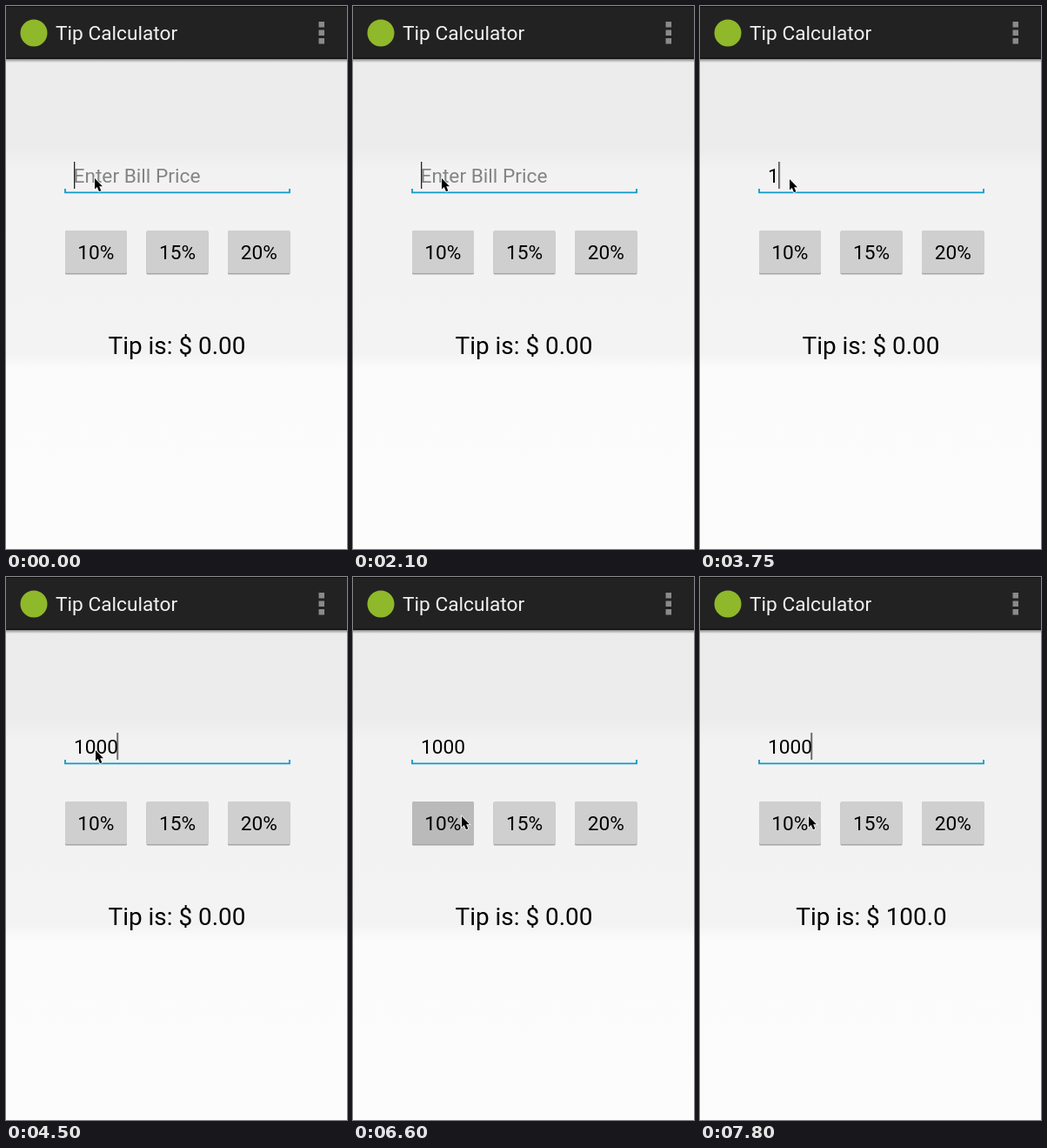
An HTML page for the animation above (8 s loop, 392 by 624 pixels).

```html
<!DOCTYPE html>
<html lang="en">
<head>
<meta charset="utf-8">
<title>Tip Calculator</title>
<style>
  html, body { margin: 0; width: 100%; height: 100%; overflow: hidden; background: #fbfbfb; }
  svg { display: block; }
  text { font: 22.7px Roboto, sans-serif; fill: #000; }
  .title { fill: #f2f2f2; }
  .hint { fill: #848484; }
  .tip { font-size: 27.9px; }
  .mid { text-anchor: middle; }

  .hint, .typed, .caret, .blink, .pressed, .before, .after, .pointer {
    animation: 8s step-end infinite;
  }
  .hint { animation-name: hint; }
  .typed { animation-name: type; }
  .caret { animation-name: caret; }
  .blink { animation-name: blink; }
  .pressed { animation-name: press; }
  .before { animation-name: before; }
  .after { animation-name: after; }
  .pointer { animation-name: point; }

  @keyframes hint { 0% { opacity: 1 } 46.875%, 100% { opacity: 0 } }
  @keyframes type {
    0% { width: 0 }
    46.875% { width: 12.7px }
    50.625% { width: 25.4px }
    52.5% { width: 38.1px }
    56.25%, 100% { width: 54px }
  }
  @keyframes caret {
    0% { transform: none }
    46.875% { transform: translateX(12.3px) }
    50.625% { transform: translateX(24.7px) }
    52.5% { transform: translateX(37.1px) }
    56.25%, 100% { transform: translateX(49.5px) }
  }
  @keyframes blink {
    0%, 13.125%, 26.25%, 37.5%, 73.125%, 86.25%, 97.5%, 100% { opacity: 1 }
    5.625%, 18.75%, 31.875%, 65.625%, 78.75%, 91.875% { opacity: 0 }
  }
  @keyframes press { 0%, 84.375%, 100% { fill: #cfcfcf } 82.5% { fill: #bababa } }
  @keyframes before { 0% { opacity: 1 } 84.375%, 100% { opacity: 0 } }
  @keyframes after { 0% { opacity: 0 } 84.375%, 100% { opacity: 1 } }
  @keyframes point {
    0% { transform: translate(102px, 198px) }
    31.875% { transform: translate(103px, 199px) }
    75% { transform: translate(118px, 233px) }
    76.875% { transform: translate(124px, 262px) }
    78.75% { transform: translate(125px, 270px) }
    80.625%, 100% { transform: translate(125px, 275px) }
  }
</style>
</head>
<body>
<svg width="392" height="624" viewBox="0 0 392 624">
  <defs>
    <linearGradient id="page" gradientUnits="userSpaceOnUse" x1="0" y1="0" x2="0" y2="624">
      <stop offset="0" stop-color="#ebebeb"/>
      <stop offset=".26" stop-color="#ececec"/>
      <stop offset=".3" stop-color="#f2f2f2"/>
      <stop offset=".64" stop-color="#f3f3f3"/>
      <stop offset=".667" stop-color="#fbfbfb"/>
      <stop offset="1" stop-color="#fcfcfc"/>
    </linearGradient>
    <linearGradient id="shade" x2="0" y2="1">
      <stop offset="0" stop-color="#000" stop-opacity=".4"/>
      <stop offset="1" stop-color="#000" stop-opacity="0"/>
    </linearGradient>
    <clipPath id="entry"><rect class="typed" x="78" y="175" width="0" height="36"/></clipPath>
  </defs>

  <rect width="392" height="624" fill="url(#page)"/>

  <rect width="392" height="61" fill="#222"/>
  <rect width="392" height="1" fill="#0c0c0c"/>
  <rect y="59" width="392" height="2" fill="#191919"/>
  <rect y="61" width="392" height="4" fill="url(#shade)"/>
  <circle cx="32" cy="31" r="15.5" fill="#8fb82a"/>
  <text class="title" x="57" y="39">Tip Calculator</text>
  <path d="M359.5 18h6.5v6.5h-6.5zM359.5 27.5h6.5v6.5h-6.5zM359.5 37h6.5v6.5h-6.5z" fill="#8a8a8a"/>

  <path d="M68 210v4.3h258v-4.3" fill="none" stroke="#0c9bcb" stroke-width="1.8"/>
  <text class="hint" x="77.5" y="203">Enter Bill Price</text>
  <text x="78" y="203" clip-path="url(#entry)">1000</text>
  <g class="caret"><rect class="blink" x="78" y="179" width="1.3" height="31" fill="#222"/></g>

  <g fill="#cfcfcf">
    <rect x="68" y="258.5" width="71" height="50" rx="1.5" fill="#a6a6a6"/>
    <rect class="pressed" x="68" y="258" width="71" height="49" rx="1.5"/>
    <rect x="161.5" y="258.5" width="71" height="50" rx="1.5" fill="#a6a6a6"/>
    <rect x="161.5" y="258" width="71" height="49" rx="1.5"/>
    <rect x="255" y="258.5" width="71.5" height="50" rx="1.5" fill="#a6a6a6"/>
    <rect x="255" y="258" width="71.5" height="49" rx="1.5"/>
  </g>
  <g class="mid">
    <text x="103.3" y="291">10%</text>
    <text x="197" y="291">15%</text>
    <text x="290.8" y="291">20%</text>
    <text class="tip before" x="196.5" y="400">Tip is: $ 0.00</text>
    <text class="tip after" x="197" y="400">Tip is: $ 100.0</text>
  </g>

  <path class="pointer" d="M0 0V12.5L2.8 10 5 15.3 7.4 14.3 5.2 9.2H9z"
        stroke="#fff" stroke-width="1.4" paint-order="stroke"/>
</svg>
</body>
</html>
```
